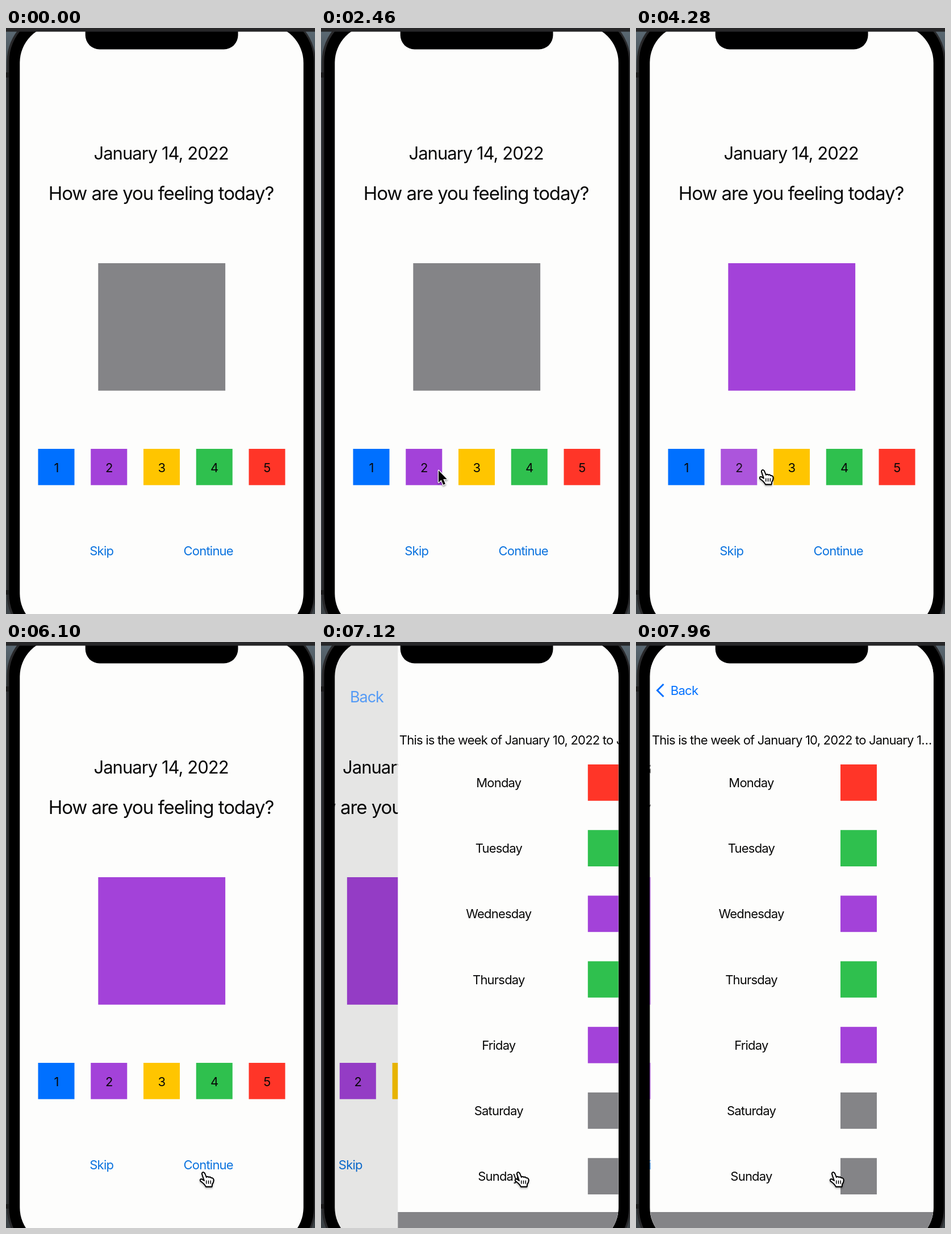
An HTML page with a canvas for the animation above (8 s loop, 544x1029 px).

```html
<!DOCTYPE html>
<html lang="en">
<head>
<meta charset="utf-8">
<title>Mood journal</title>
<style>
  html, body { margin: 0; width: 100%; height: 100%; overflow: hidden; background: #000; }
  canvas { display: block; width: 544px; height: 1029px; }
</style>
</head>
<body>
<canvas id="stage" width="544" height="1029"></canvas>
<script>
const ctx = document.getElementById('stage').getContext('2d');
const LOOP = 8000;
const BLUE = '#0070ff', PURPLE = '#a342d9', YELLOW = '#ffc500';
const GREEN = '#2fc04e', RED = '#ff3528', GRAY = '#848487';
const LINK = '#0a72de', PAPER = '#fdfdfc', INK = '#080808';
const SCREEN = { x: 24.3, w: 499.4 };

// Moments of the interaction, in ms
const HAND_AT = 3000, PRESS = 3800, RELEASE = 4050;
const TAP = 6350, TAP_END = 6560, PUSH = 6660;

const clamp = v => Math.max(0, Math.min(1, v));
const lerp = (a, b, k) => a + (b - a) * k;
const ease = k => k * k * (3 - 2 * k);

// [time, x, y] of the pointer
const PATH = [
  [350, 548, 972], [880, 336, 900], [1080, 321, 878], [1700, 321, 881],
  [2350, 206, 775], [2800, 206, 775], [3000, 222, 776],
  [4320, 222, 776], [5000, 352, 946], [5700, 346, 931], [8000, 346, 931]
];

function pointerAt(t) {
  if (t < PATH[0][0]) return null;
  const i = PATH.findIndex(p => p[0] > t);
  const a = PATH[i - 1], b = PATH[i];
  const k = ease((t - a[0]) / (b[0] - a[0]));
  return [lerp(a[1], b[1], k), lerp(a[2], b[2], k)];
}

function pressAlpha(t, down, up) {
  if (t < down) return 1;
  if (t < up) return 0.2;
  return lerp(0.2, 1, clamp((t - up) / 265));
}

// Critically damped spring for the page push
function pushProgress(t) {
  if (t < PUSH) return 0;
  const u = (t - PUSH) * 0.00618;
  return 1 - (1 + u) * Math.exp(-u);
}

function rect(x, y, w, h, color) {
  ctx.fillStyle = color;
  ctx.fillRect(x, y, w, h);
}

function text(str, x, y, size = 22, color = INK, align = 'center') {
  const tracking = size > 30 ? -0.032 : -0.036;
  ctx.font = `${size}px Inter, sans-serif`;
  ctx.letterSpacing = `${tracking * size}px`;
  ctx.textAlign = align;
  ctx.fillStyle = color;
  ctx.fillText(str, x, y);
}

function rounded(x, y, w, h, r, color) {
  ctx.beginPath();
  ctx.roundRect(x, y, w, h, r);
  ctx.fillStyle = color;
  ctx.fill();
}

function withAlpha(alpha, draw) {
  ctx.save();
  ctx.globalAlpha = alpha;
  draw();
  ctx.restore();
}

function phoneBody() {
  const sky = ctx.createLinearGradient(0, 7, 0, 90);
  sky.addColorStop(0, '#5a6872');
  sky.addColorStop(1, '#3c4246');
  rect(0, 0, 544, 1029, sky);
  rounded(1.5, -29, 543.5, 1111, 88, '#29292b');
  rounded(5.5, -25, 536.5, 1103, 84, '#000');
  rect(0, 78, 5, 9, '#1a1a1b');
  rect(0, 987, 5, 8, '#1a1a1b');
}

function moodPage(t) {
  rect(-200, 0, 1000, 1029, PAPER);
  text('January 14, 2022', 273, 231, 31);
  text('How are you feeling today?', 273, 302, 33);
  rect(162.3, 413, 223.8, 223.8, t < RELEASE ? GRAY : PURPLE);
  [BLUE, PURPLE, YELLOW, GREEN, RED].forEach((color, i) => {
    const x = 56.5 + 92.75 * i;
    withAlpha(i === 1 ? pressAlpha(t, PRESS, RELEASE) : 1, () => {
      rect(x, 739, 64, 63.7, color);
      text(String(i + 1), x + 32, 780);
    });
  });
  text('Skip', 168.2, 926, 22, LINK);
  withAlpha(pressAlpha(t, TAP, TAP_END), () => text('Continue', 356.2, 926, 22, LINK));
}

function weekPage() {
  const days = [
    ['Monday', RED], ['Tuesday', GREEN], ['Wednesday', PURPLE], ['Thursday', GREEN],
    ['Friday', PURPLE], ['Saturday', GRAY], ['Sunday', GRAY]
  ];
  rect(24, 0, 520, 1029, PAPER);
  text('This is the week of January 10, 2022 to January 1…', 26.5, 180, 22, INK, 'left');
  days.forEach(([name, color], i) => {
    const y = 215 + 115.2 * i;
    text(name, 201.5, y + 40);
    rect(358.5, y, 64, 63.8, color);
  });
  rect(24, 1001, 520, 28, GRAY);
}

function backButton(p) {
  withAlpha(clamp((p - 0.4) / 0.6), () =>
    text('Back', lerp(16, 61, p), lerp(152, 93, p), lerp(44, 22, p), BLUE, 'left'));
  withAlpha(clamp((p - 0.8) / 0.18), () => {
    ctx.beginPath();
    ctx.moveTo(48.5, 74);
    ctx.lineTo(37.5, 85);
    ctx.lineTo(48.5, 96);
    ctx.strokeStyle = BLUE;
    ctx.lineWidth = 3;
    ctx.stroke();
  });
}

const ARROW = new Path2D('M1 2V23L5.7 18.6L9.2 27L12.9 25.4L9.3 17.2H15.8Z');
const HAND = new Path2D('M4.5 4Q4.5 1 7 1.2Q9 1.5 10 4.5L12.3 10Q14.5 7.5 16.5 10' +
  'Q19 8.6 20.8 11.2Q24 10.5 25 14Q25.5 18 22.5 22L22 26.5H11.5' +
  'Q9 21.5 1.8 16.5Q0 13 4 13L8.5 16Z');
const CREASES = new Path2D('M12.2 15.5V21.5M16 15.5V21.5M19.8 15.5V21.5');

function pointer(t) {
  const at = pointerAt(t);
  if (!at) return;
  const hand = t >= HAND_AT;
  ctx.save();
  ctx.translate(at[0] - (hand ? 5.5 : 0), at[1] - (hand ? 1 : 0));
  ctx.lineJoin = 'round';
  ctx.shadowColor = 'rgba(0,0,0,.4)';
  ctx.shadowBlur = 3;
  ctx.shadowOffsetY = 2;
  ctx.fillStyle = hand ? '#fff' : '#000';
  ctx.strokeStyle = hand ? '#000' : '#fff';
  ctx.lineWidth = hand ? 1.8 : 2.6;
  const shape = hand ? HAND : ARROW;
  ctx.stroke(shape);
  ctx.shadowColor = 'transparent';
  ctx.fill(shape);
  if (hand) {
    ctx.stroke(shape);
    ctx.lineWidth = 1.5;
    ctx.stroke(CREASES);
  }
  ctx.restore();
}

function draw(t) {
  const p = pushProgress(t);
  phoneBody();

  ctx.save();
  ctx.beginPath();
  ctx.roundRect(SCREEN.x, -5, SCREEN.w, 1064, 66);
  ctx.clip();
  ctx.save();
  ctx.translate(-0.3 * SCREEN.w * p, 0);
  moodPage(t);
  ctx.restore();
  if (p > 0) {
    rect(0, 0, 544, 1029, `rgba(0,0,0,${0.12 * p})`);
    ctx.save();
    ctx.translate(SCREEN.w * (1 - p), 0);
    weekPage();
    ctx.restore();
    backButton(p);
  }
  ctx.restore();

  rounded(139.7, -20, 268.8, 57.5, 25, '#000');
  rect(0, 0, 544, 6.5, '#272729');
  pointer(t);
}

const start = performance.now();
function tick() {
  draw((performance.now() - start) % LOOP);
  requestAnimationFrame(tick);
}
tick();
</script>
</body>
</html>
```
